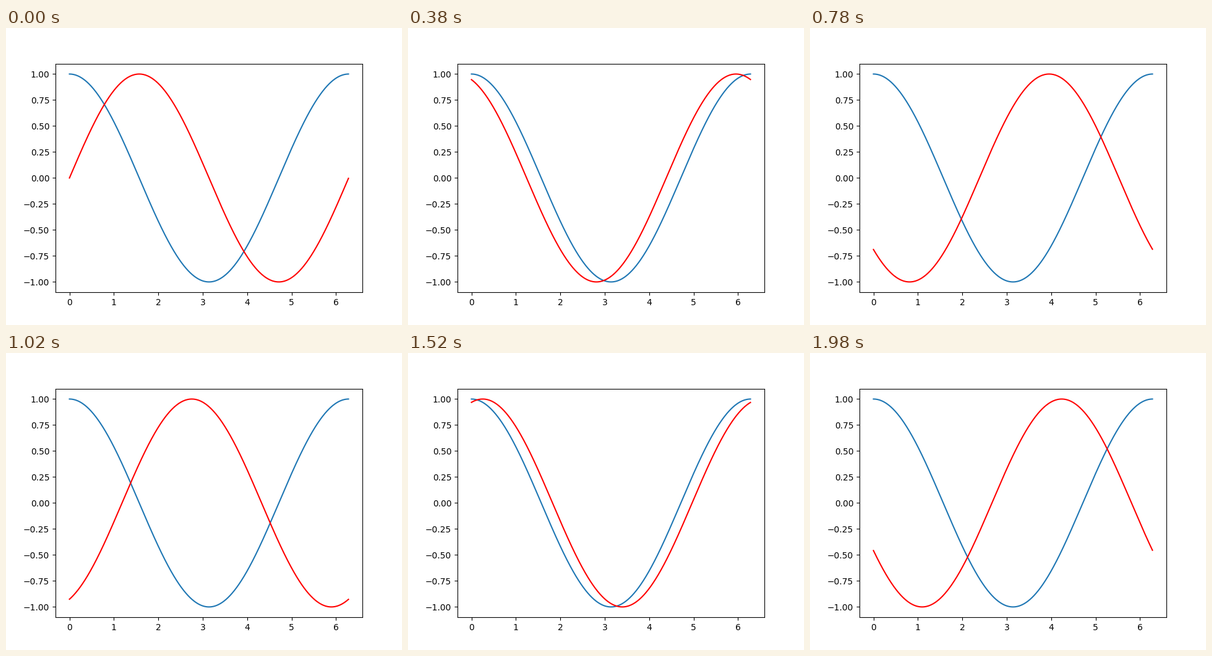
A matplotlib script that plays this animation: 640 px wide and 480 px high, repeating every 2000 ms.

```python
import numpy as np
import matplotlib.pyplot as plt
from matplotlib.animation import FuncAnimation

FRAMES = 100
INTERVAL = 20  # ms
PHASE_STEP = 0.1  # radians per frame

x = np.arange(0, 2 * np.pi, 0.01)

fig, ax = plt.subplots(figsize=(6.4, 4.8), dpi=100)
ax.plot(x, np.cos(x))
wave, = ax.plot(x, np.sin(x), color="red")


def update(i):
    wave.set_ydata(np.sin(x + i * PHASE_STEP))
    return wave,


anim = FuncAnimation(fig, update, frames=FRAMES, interval=INTERVAL,
                     repeat=True, repeat_delay=0)
plt.show()
```
